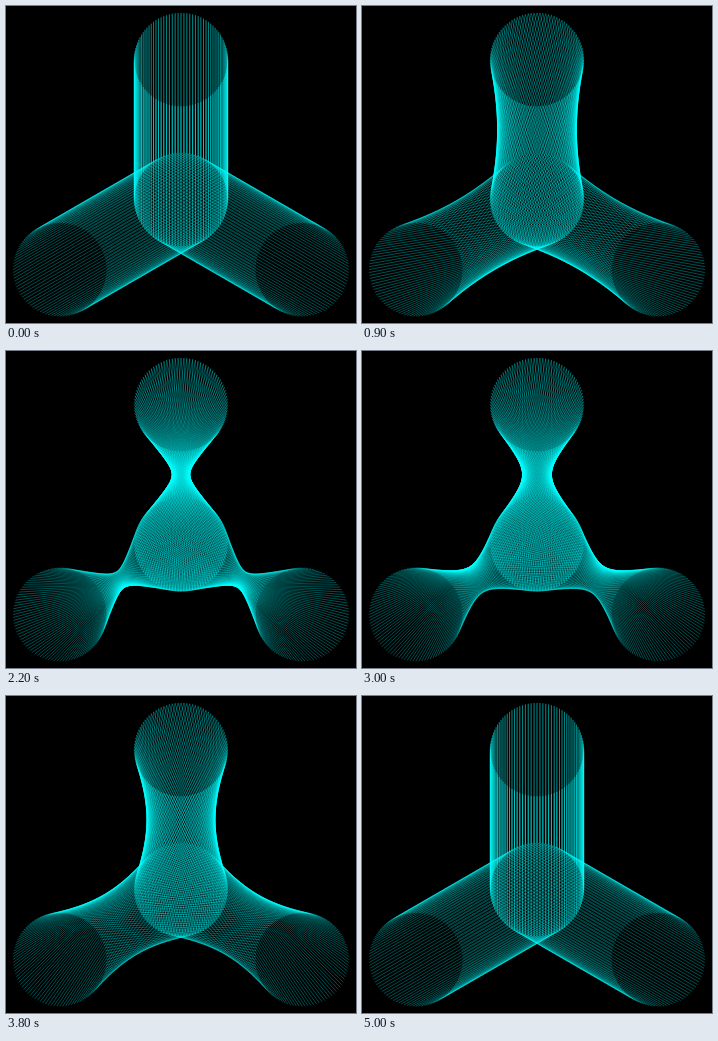
An HTML page for the animation above (5100 ms loop, 350 by 317 pixels).

```html
<!DOCTYPE html>
<html lang="en">
<head>
<meta charset="utf-8">
<title>Twisting tubes</title>
<style>
  html, body { margin: 0; width: 100%; height: 100%; overflow: hidden; background: #000; }
  svg { display: block; width: 350px; height: 317px; }
  line { stroke: #0ff; stroke-width: 0.5; stroke-opacity: 0.62; }
</style>
</head>
<body>
<svg id="stage" viewBox="0 0 350 317"></svg>
<script>
  const LOOP = 5100, STEP = 100, TURN_STEPS = 50;
  const COUNT = 100, RADIUS = 46.7, ARM = 140;
  const TAU = Math.PI * 2;
  const hub = { x: 175, y: 193.6 };
  const stage = document.getElementById('stage');

  const onCircle = (c, r, a) => ({ x: c.x + r * Math.cos(a), y: c.y + r * Math.sin(a) });

  // The left-right mirrored halves share the upper arm, which twists both ways
  const arms = [
    { heading: -TAU / 4, spin: 1 },
    { heading: -TAU / 4, spin: -1 },
    { heading: TAU * 5 / 12, spin: 1 },
    { heading: TAU / 12, spin: -1 }
  ];

  const threads = [];
  for (const { heading, spin } of arms) {
    const disc = onCircle(hub, ARM, heading);
    for (let i = 0; i < COUNT; i++) {
      const angle = i * TAU / COUNT;
      const start = onCircle(hub, RADIUS, angle);
      const line = document.createElementNS('http://www.w3.org/2000/svg', 'line');
      line.setAttribute('x1', start.x.toFixed(3));
      line.setAttribute('y1', start.y.toFixed(3));
      stage.appendChild(line);
      threads.push({ line, disc, angle, spin });
    }
  }

  function draw(twist) {
    for (const { line, disc, angle, spin } of threads) {
      const end = onCircle(disc, RADIUS, angle + spin * twist);
      line.setAttribute('x2', end.x.toFixed(3));
      line.setAttribute('y2', end.y.toFixed(3));
    }
  }

  let shown = -1;
  const begin = performance.now();

  function tick() {
    const time = (performance.now() - begin) % LOOP;
    const step = Math.floor(time / STEP);
    if (step !== shown) {
      shown = step;
      draw(step / TURN_STEPS * TAU);
    }
    requestAnimationFrame(tick);
  }
  tick();
</script>
</body>
</html>
```
